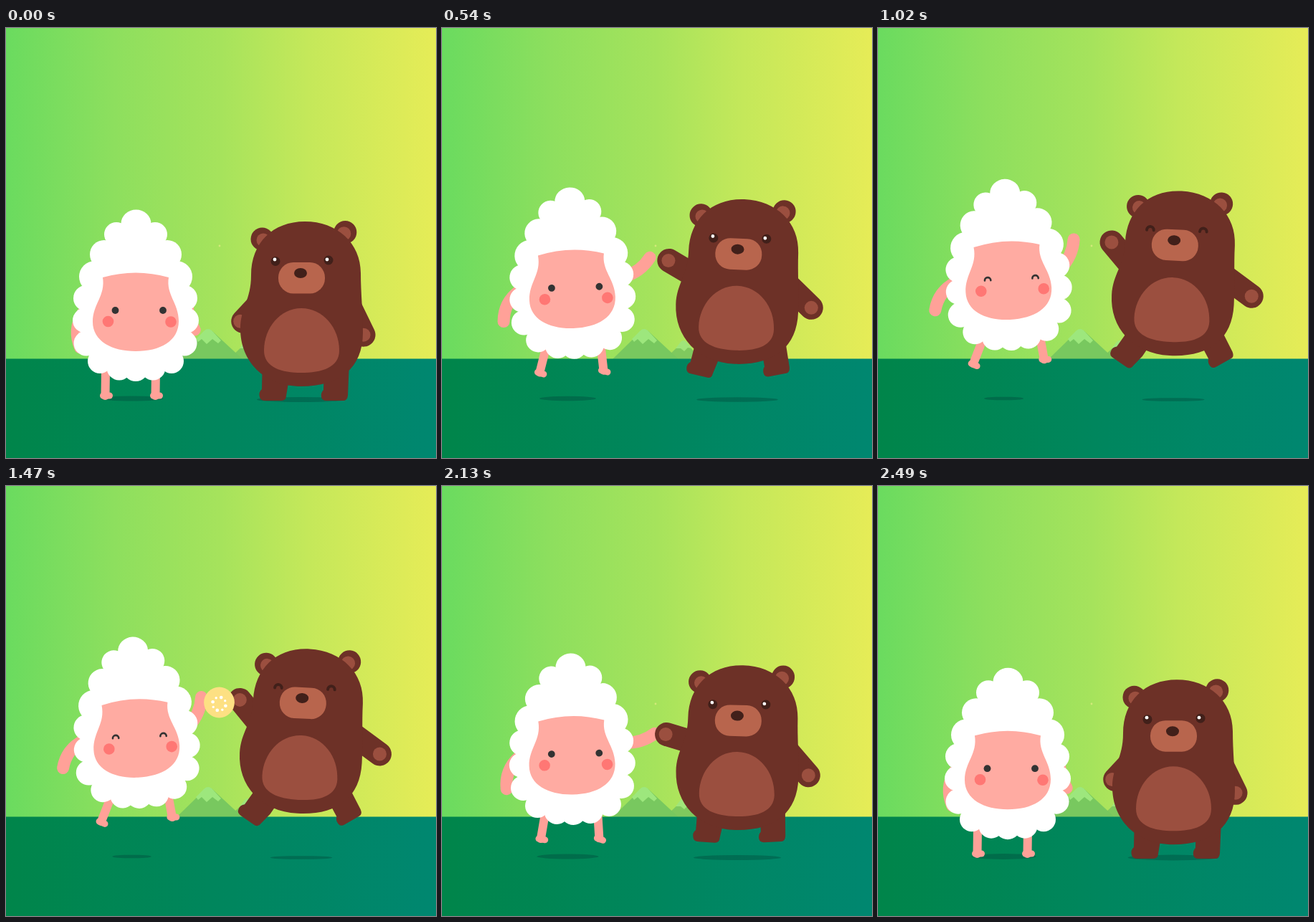
Write an HTML page with a canvas that moves like this. It is 600 px wide and 600 px high and loops after 2.52 s.

```html
<!DOCTYPE html>
<html lang="en">
<head>
<meta charset="utf-8">
<title>High five</title>
<style>
  html, body { margin: 0; width: 100%; height: 100%; overflow: hidden; }
  canvas { display: block; }
</style>
</head>
<body>
<canvas id="stage" width="600" height="600"></canvas>
<script>
const ctx = document.getElementById('stage').getContext('2d');
const LOOP = 2520, STEP = 30, PEAK = 1290;
const START = 90, TAKEOFF = 365, HAPPY = 860;
const JUMP = 43.2;

const PINK = '#ffaba2', LIMB = '#ffa198', BLUSH = '#ff7774', INK = '#333';
const BROWN = '#6d3127', TAN = '#9b4f3f', SNOUT = '#b8654d', DARK = '#41201a';

const lerp = (a, b, k) => a + (b - a) * k;
const rad = deg => deg * Math.PI / 180;

function gradient(from, to) {
  const g = ctx.createLinearGradient(0, 0, 600, 0);
  g.addColorStop(0, from);
  g.addColorStop(1, to);
  return g;
}
const sky = gradient('#6adb5f', '#e6ec57');
sky.addColorStop(0.25, '#8ddf5e');
sky.addColorStop(0.5, '#a6e35c');
sky.addColorStop(0.7, '#c4e85a');
const ground = gradient('#00854a', '#008770');

function fill(path, color) {
  ctx.fillStyle = color;
  ctx.fill(typeof path === 'string' ? new Path2D(path) : path);
}

function oval(x, y, rx, color, ry = rx) {
  ctx.fillStyle = color;
  ctx.beginPath();
  ctx.ellipse(x, y, rx, ry, 0, 0, Math.PI * 2);
  ctx.fill();
}

function stroke(path, color, width) {
  ctx.strokeStyle = color;
  ctx.lineWidth = width;
  ctx.lineCap = ctx.lineJoin = 'round';
  ctx.stroke(new Path2D(path));
}

function turned(x, y, deg, draw) {
  ctx.save();
  ctx.translate(x, y);
  ctx.rotate(rad(deg));
  ctx.translate(-x, -y);
  draw();
  ctx.restore();
}

// Arm from a shoulder; bend pushes the middle sideways. Returns the hand.
function arm(x, y, deg, length, width, color, bend = 0) {
  const dx = Math.cos(rad(deg)), dy = Math.sin(rad(deg));
  const hand = [x + dx * length, y + dy * length];
  const mid = [x + dx * length / 2 - dy * bend, y + dy * length / 2 + dx * bend];
  stroke(`M${x},${y}Q${mid} ${hand}`, color, width);
  return hand;
}

function smileEye(x, y, r, width, color) {
  stroke(`M${x - r},${y}A${r},${r} 0 0 1 ${x + r},${y}`, color, width);
}

// Rise and fall mirror each other around PEAK.
function pose(time) {
  const t = PEAK - Math.abs(time - PEAK);
  const squat = Math.sin(Math.PI * Math.min(1, Math.max(0, (t - 70) / (TAKEOFF - 70))));
  const lift = t < TAKEOFF ? 0 : 1 - Math.exp(-0.0073 * (t - TAKEOFF));
  return {
    t,
    lift,
    tuck: Math.sin(Math.PI * lift),
    reach: t < START ? 0
      : t < 330 ? 0.31 * ((t - START) / 240) ** 3
      : 1 - Math.exp(-0.0056 * (t - 263)),
    squat: t < START ? 0 : squat,
    happy: t > HAPPY
  };
}

function scenery() {
  ctx.fillStyle = sky;
  ctx.fillRect(0, 0, 600, 600);
  fill('M311,462L337,437 363,462Z', '#7fc95e');
  fill('M326,447L333,438Q337,434 341,438L349,447 343,446 338,451 333,447Z', '#a0e57a');
  fill('M238,462L274,427Q282,416 290,425L330,462Z', '#78c85f');
  fill('M265,434L275,424Q282,416 289,424L300,436 296,440 288,434 280,441 273,434 268,438Z', '#9de77d');
  ctx.fillStyle = ground;
  ctx.fillRect(0, 461.5, 600, 139);
}

function shadow(x, y, wide, narrow, { lift, squat }) {
  const k = lift ** 4;
  oval(x, y, lerp(wide, narrow, k) + 6 * squat, 'rgba(0,75,60,.42)', lerp(3.6, 2.3, k) + 1.4 * squat);
}

const WOOL = [
  [158, 474, 17.5], [131, 465, 17], [112, 440, 17.5], [110.5, 408, 17.5], [112, 377, 18],
  [124, 347, 22], [137, 316, 20], [154, 288, 17], [181.5, 273, 21], [208, 288, 17],
  [225, 316, 20], [238, 347, 22], [249, 377, 18], [251, 408, 18], [249, 440, 17.5],
  [231, 465, 17], [205, 474, 17.5], [181, 475, 18]
];

function sheepLeg(hip, ankle, toeAngle) {
  const toe = [ankle[0] + 6 * Math.cos(rad(toeAngle)), ankle[1] + 6 * Math.sin(rad(toeAngle))];
  stroke(`M${hip}L${ankle}`, LIMB, 12);
  stroke(`M${ankle[0] - 3},${ankle[1]}L${toe}`, LIMB, 9);
}

function sheep(p) {
  const { lift, tuck, squat, happy } = p;
  const swing = p.reach ** 1.5;
  shadow(175.5, 517, 44, 27, p);
  ctx.save();
  ctx.translate(0, -JUMP * lift);
  sheepLeg([lerp(139, 146, Math.sqrt(lift)), 478], [lerp(138.5, 133, lift ** 3), lerp(513, 511, lift)], 35 * lift);
  sheepLeg([lerp(209, 227, lift), 478], [lerp(208.5, 232, lift), lerp(513, 505, lift ** 2)], 30 * tuck);
  ctx.translate(1.2 * lift, 4 * squat ** 2);
  arm(107, 398, lerp(94, 127, swing), 48, 17, LIMB, 12);
  arm(254, 378, lerp(78, -68, p.reach), 44, 17, LIMB, 8);
  turned(181, 396, -2.6 * lift, () => {
    fill('M' + WOOL.map(([x, y]) => [x, y]).join('L') + 'Z', '#fff');
    for (const [x, y, r] of WOOL) oval(x, y, r, '#fff', x === 181.5 ? 19.5 : r);
    ctx.translate(-0.5 * lift, -1.2 * lift);
    fill('M135,348Q181,335 227,348C223,372 241,384 241,409C241,437 215,451 181,451C148,451 121,437 121,410C121,385 139,374 135,348Z', PINK);
    oval(142.5, 409.5, 7.8, BLUSH);
    oval(230, 410, 7.8, BLUSH);
    for (const x of [152.5, 219]) {
      if (happy) smileEye(x, 395, 4.2, 2.6, INK);
      else oval(x, 394, 4.9, INK);
    }
  });
  ctx.restore();
}

function bear(p) {
  const { lift, tuck, reach, squat, happy } = p;
  const swing = reach ** 1.5;
  shadow(412, 518.5, 62, 43, p);
  ctx.save();
  ctx.translate(0, -JUMP * lift - 3 * tuck);
  turned(372, 457, 35 * lift ** 3, () =>
    fill('M358,455L357,504Q352,508 354,515Q355,520 362,520H384Q391,520 391,513L394,495V455Z', BROWN));
  turned(451, 470, -30 * lift ** 3, () =>
    fill('M444,465L443,505Q439,509 440,515Q441,520 447,520H471Q476,520 477,513L479,465Z', BROWN));
  ctx.translate(0, 3 * tuck + 4 * squat ** 2);
  const left = arm(358, 380, lerp(133, 231.5, reach), lerp(40, 50, reach), 33, BROWN);
  oval(left[0] - lerp(4, 0, reach), left[1], 9.5, TAN);
  const right = arm(478, 385, lerp(64, 36, swing), lerp(48, 54, swing), 33, BROWN);
  oval(right[0], right[1], 9.5, TAN);
  turned(412, 400, 3 * lift, () => {
    oval(357.5, 294.5, 16, BROWN);
    oval(359, 296, 9.5, TAN);
    oval(473.3, 285, 16, BROWN);
    oval(471.5, 287, 9.8, TAN);
    fill('M342,345C342,300 372,270 417,270C462,270 495,300 495,342C495,370 498,395 498,425C498,475 465,500 412,500C360,500 327,465 327,420C327,390 342,380 342,345Z', BROWN);
    fill('M412,391C442,391 465,418 465,450C465,474 440,481 412,481C385,481 360,474 360,450C360,418 383,391 412,391Z', TAN);
    for (const [x, y, shine] of [[376, 325.5, 375], [450, 324, 448]]) {
      if (happy) {
        smileEye(x, y + 1, 4.8, 4, DARK);
      } else {
        oval(x, y, 6.5, DARK);
        oval(shine, 323, 2.4, '#fff');
      }
    }
    ctx.translate(-lift, -3 * lift);
    const snout = new Path2D();
    snout.roundRect(380, 327, 65, 43.5, 21);
    fill(snout, SNOUT);
    oval(411, 342, 9, DARK, 7);
  });
  ctx.restore();
}

// Yellow pop where the two hands meet.
function spark({ t }) {
  const x = 297.5, y = 302;
  const k = Math.max(0, (t - 1030) / (PEAK - 1030));
  if (k === 0) return oval(298, 304, 1.4, 'rgba(255,240,150,.5)');
  const grow = Math.sin(k * Math.PI / 2);
  oval(x, y, 46 * grow, '#fde083');
  for (let i = 0; i < 8; i++) {
    const a = i * Math.PI / 4 + 0.3, d = 20 * grow;
    oval(x + d * Math.cos(a), y + 2 + d * Math.sin(a), (i % 2 ? 3.6 : 5) * grow, '#fff');
  }
}

function frame() {
  const time = Math.floor(performance.now() % LOOP / STEP) * STEP;
  const p = pose(time);
  scenery();
  sheep(p);
  bear(p);
  spark(p);
  requestAnimationFrame(frame);
}
frame();
</script>
</body>
</html>
```
